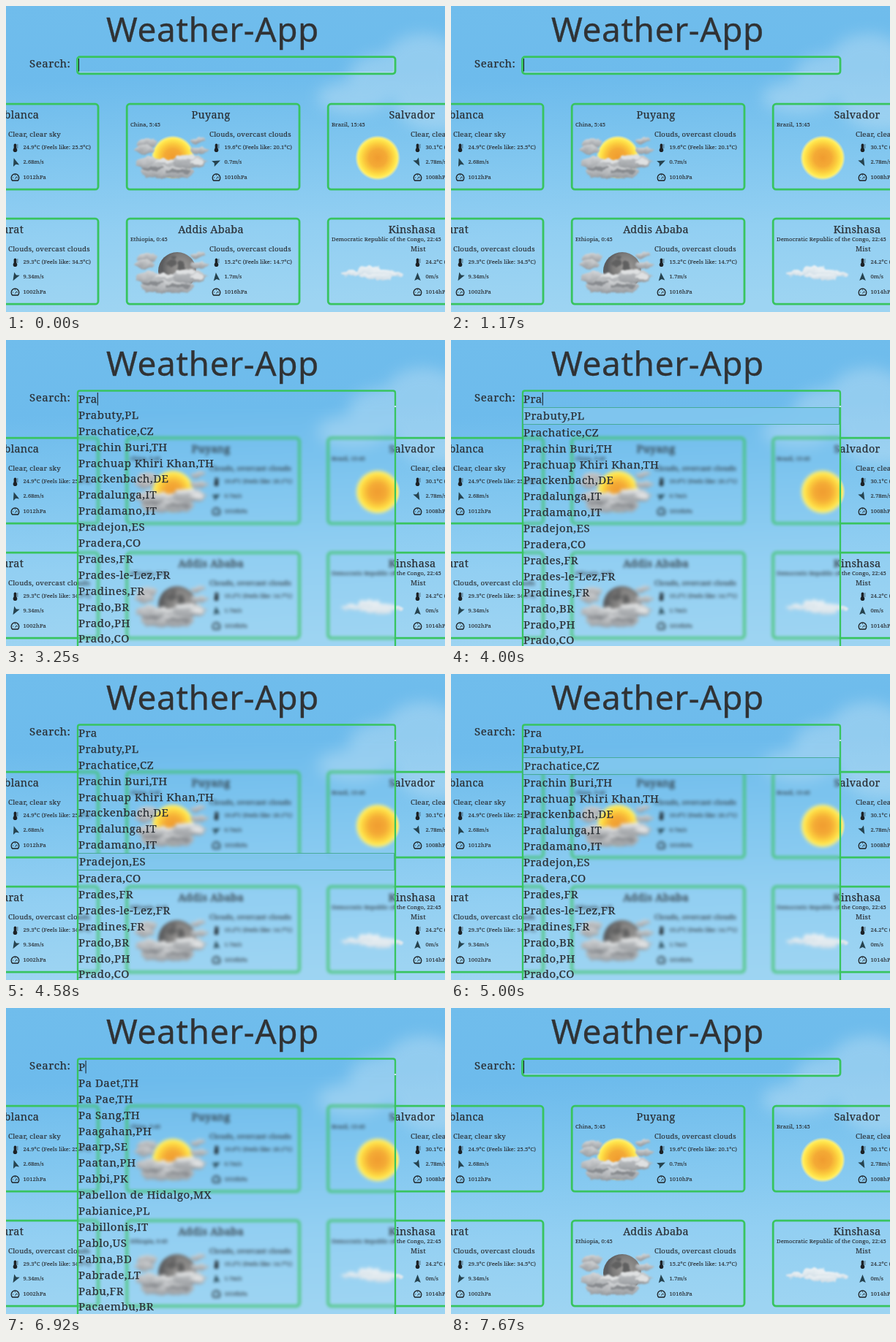
These frames come from a looping animation (600 by 419 pixels, 8000 ms). An HTML page:

```html
<!DOCTYPE html>
<html lang="en">
<head>
<meta charset="utf-8">
<title>Weather-App</title>
<style>
  html, body { margin: 0; width: 100%; height: 100%; overflow: hidden; background: #78c0ea; }
  svg { position: absolute; left: 0; top: 0; width: 600px; height: 419px; }
  text { font-family: "Noto Serif", serif; fill: #2b3036; stroke: #2b3036; stroke-width: .15; white-space: pre; }
  .title { font: 46px "Noto Sans", sans-serif; letter-spacing: .6px; fill: #303234; stroke: #303234; stroke-width: .3; stroke-linejoin: round; }
  .big { font-size: 15px; letter-spacing: .5px; stroke-width: .25; }
  .city { font-size: 14.4px; letter-spacing: .3px; text-anchor: middle; stroke-width: .25; }
  .sky { font-size: 9.7px; letter-spacing: .2px; }
  .small { font-size: 7.6px; letter-spacing: .12px; }
  .edge { fill: none; stroke: #38c45f; }
  #panel { position: absolute; left: 98px; top: 93px; width: 434px; height: 326px; backdrop-filter: blur(2px); }
</style>
</head>
<body>
<svg id="scene" viewBox="0 0 600 419">
  <defs>
    <linearGradient id="air" x2=".05" y2="1">
      <stop offset="0" stop-color="#70bdec"/>
      <stop offset=".25" stop-color="#6dbbec"/>
      <stop offset=".5" stop-color="#80c6ef"/>
      <stop offset=".75" stop-color="#92cff2"/>
      <stop offset="1" stop-color="#9dd4f2"/>
    </linearGradient>
    <radialGradient id="sun">
      <stop offset="0" stop-color="#f09c30"/>
      <stop offset=".38" stop-color="#f4aa35"/>
      <stop offset=".6" stop-color="#fbc83c"/>
      <stop offset=".78" stop-color="#ffe44a"/>
      <stop offset=".87" stop-color="#ffee68"/>
      <stop offset="1" stop-color="#fff3a0" stop-opacity="0"/>
    </radialGradient>
    <radialGradient id="moon" cx=".6" cy=".4">
      <stop offset="0" stop-color="#a09e9c"/>
      <stop offset=".7" stop-color="#7c7b7a"/>
      <stop offset="1" stop-color="#5b5c5e"/>
    </radialGradient>
    <linearGradient id="puff" x2="0" y2="1">
      <stop offset="0" stop-color="#d3d5d7"/>
      <stop offset=".55" stop-color="#b0b3b6"/>
      <stop offset="1" stop-color="#94979b"/>
    </linearGradient>
    <linearGradient id="mist" x2="0" y2="1">
      <stop offset="0" stop-color="#eef3f6"/>
      <stop offset="1" stop-color="#cfdce5"/>
    </linearGradient>
    <filter id="soft" x="-30%" y="-30%" width="160%" height="160%">
      <feTurbulence type="fractalNoise" baseFrequency=".09" numOctaves="2" seed="4"/>
      <feDisplacementMap in="SourceGraphic" scale="9" xChannelSelector="R" yChannelSelector="G"/>
      <feGaussianBlur stdDeviation="1.2"/>
    </filter>
    <filter id="haze" x="-60%" y="-60%" width="220%" height="220%"><feGaussianBlur stdDeviation="10"/></filter>
  </defs>
  <rect width="600" height="419" fill="url(#air)"/>
  <g id="world"></g>
</svg>
<div id="panel"></div>
<svg id="ui" viewBox="0 0 600 419"></svg>

<script>
const $ = id => document.getElementById(id);
const text = (cls, x, y, s) => `<text class="${cls}" x="${x}" y="${y}">${s}</text>`;
const ellipses = (list, fill) => list.map(([x, y, rx, ry]) =>
  `<ellipse cx="${x}" cy="${y}" rx="${rx}" ry="${ry}" fill="${fill}"/>`).join('');
const disc = (x, y, r, fill) => `<circle cx="${x}" cy="${y}" r="${r}" fill="${fill}"/>`;
const soft = s => `<g filter="url(#soft)">${s}</g>`;

// Icon coordinates are relative to the top left corner of a card.
const clouds = soft(ellipses([
  [28, 55, 14, 7], [25, 64, 13, 6], [97, 51, 10, 4], [100, 65, 12, 4],
  [32, 82, 19, 8], [58, 86, 26, 9], [86, 80, 24, 10], [56, 95, 38, 8]], 'url(#puff)') +
  ellipses([[82, 73, 14, 4], [52, 80, 14, 3], [98, 80, 9, 4]], '#dfe1e2') +
  ellipses([[36, 90, 15, 3], [72, 93, 16, 3]], '#888b8f'));

const icons = {
  none: '',
  sun: disc(69, 75, 31, 'url(#sun)'),
  cloudySun: disc(64, 74, 30, 'url(#sun)') + clouds,
  cloudyMoon: disc(70, 73, 26, 'url(#moon)') +
    soft(ellipses([[61, 62, 7, 5], [75, 66, 6, 6], [66, 54, 5, 3]], '#616161')) + clouds,
  mist: soft(ellipses([
    [38, 76, 20, 3], [58, 73, 18, 7], [76, 75, 18, 6], [90, 77, 14, 3], [66, 81, 24, 4]], 'url(#mist)'))
};

const gauges = wind => `<g transform="translate(123.5 61)" fill="#1d2226">
  <rect x="-1.8" y="-5.5" width="3.6" height="9" rx="1.8"/><circle cy="3.3" r="2.8"/>
  <path d="M2.4-4h1.6M2.4-2h1.6M2.4 0h1.6" stroke="#1d2226" stroke-width=".7"/>
  <path d="M0-6L4.3 5L0 3L-4.3 5Z" transform="translate(0 20) rotate(${wind})" fill="#26434f"/>
  <g transform="translate(0 41)" fill="none" stroke="#1d2226">
    <path d="M-3.8 4A5.3 5.3 0 1 1 3.8 4Z" stroke-width="1.3"/>
    <path d="M0 1.6L2.5-1.6M-3.4 0h1M0-3.6v1M2.6 .3h1" stroke-width="1"/>
  </g></g>`;

function card(col, row, city, place, sky, temp, speed, pressure, wind, icon) {
  return `<g transform="translate(${164 + 275 * col} ${133 + 157 * row})">
    <rect class="edge" x="1.2" y="1.2" width="235.8" height="117" rx="4" stroke-width="2.8"/>
    ${icons[icon]}${gauges(wind)}` +
    text('city', 116, 21, city) + text('small', 6, 32.3, place) + text('sky', 114, 45.7, sky) +
    text('small', 134.5, 63, temp) + text('small', 134.5, 83.3, speed + 'm/s') +
    text('small', 134.5, 104, pressure + 'hPa') + '</g>';
}

const feel = (a, b) => `${a}°C (Feels like: ${b}°C)`;
const overcast = 'Clouds, overcast clouds', clear = 'Clear, clear sky';

$('world').innerHTML =
  `<g filter="url(#haze)" opacity=".3">${ellipses([
    [570, 70, 50, 32], [520, 95, 52, 30], [475, 125, 50, 22], [590, 130, 60, 40]], '#e9f3f8')}</g>` +
  text('title', 137, 48.5, 'Weather-App') + text('big', 32, 84, 'Search:') +
  card(-1, 0, 'Casablanca', '', clear, feel('24.9', '25.5'), '2.68', 1012, -18, 'none') +
  card(0, 0, 'Puyang', 'China, 5:45', overcast, feel('19.6', '20.1'), '0.7', 1010, 65, 'cloudySun') +
  card(1, 0, 'Salvador', 'Brazil, 15:45', clear, feel('30.1', '33.2'), '2.78', 1008, 152, 'sun') +
  card(-1, 1, 'Surat', '', overcast, feel('29.3', '34.5'), '9.34', 1002, 210, 'none') +
  card(0, 1, 'Addis Ababa', 'Ethiopia, 0:45', overcast, feel('15.2', '14.7'), '1.7', 1016, -6, 'cloudyMoon') +
  card(1, 1, 'Kinshasa', 'Democratic Republic of the Congo, 22:45', 'Mist', feel('24.2', '24.9'), '0', 1014, 0, 'mist');

const split = s => s.split('|');
const listP = split('Pa Daet,TH|Pa Pae,TH|Pa Sang,TH|Paagahan,PH|Paarp,SE|Paatan,PH|Pabbi,PK|Pabellon de Hidalgo,MX|Pabianice,PL|Pabillonis,IT|Pablo,US|Pabna,BD|Pabrade,LT|Pabu,FR|Pacaembu,BR');
const listPr = split('Prabuty,PL|Prachatice,CZ|Prachin Buri,TH|Prachuap Khiri Khan,TH|Prackenbach,DE|Pradalunga,IT|Pradamano,IT|Pradejon,ES|Pradera,CO|Prades,FR|Prades-le-Lez,FR|Pradines,FR|Prado,BR|Prado,PH|Prado,CO');

// Value of the last [start, value] step that has begun.
const at = (steps, t) => steps.filter(s => s[0] <= t).pop()[1];
const typed = [[0, ''], [2330, 'P'], [2830, 'Pr'], [3170, 'Pra'], [6670, 'Pr'], [6920, 'P'], [7250, '']];
const caret = [[0, 1], [2000, 0], [2330, 1], [4500, 0], [5580, 1]];
const hovers = [[0, -1], [4830, 2], [5000, 1], [5080, 0], [5250, -1]];

function hoverAt(t) {
  if (t >= 4000 && t < 4830) return Math.min(7, Math.floor((t - 3990) / 83));
  return at(hovers, t);
}

function draw(query, hover, blink) {
  const open = query !== '';
  $('panel').style.display = open ? 'block' : 'none';
  let out;
  if (open) {
    out = '<path class="edge" d="M98 419V72.5q0-3 3-3H529q3 0 3 3V419" stroke-width="2.3"/>' +
      '<path d="M532 90v2" stroke="#c6e8e4" stroke-width="2.3"/>';
    (query === 'P' ? listP : listPr).forEach((name, i) => {
      const on = i === hover;
      const shift = hover < 0 || i < hover ? 0 : on ? 1 : 2;
      const y = 107.8 + 21.9 * i + shift;
      if (on) out += `<rect x="98.5" y="${Math.round(y - 16.8) + .5}" width="432" height="23" fill="#80c6ee" fill-opacity=".93" stroke="#3fa68c" stroke-opacity=".85"/>`;
      out += text('big', on ? 100 : 99, y, name);
    });
  } else {
    out = '<path d="M100 90.5H530V72" fill="none" stroke="#d4ecf4" stroke-opacity=".55"/>' +
      '<rect class="edge" x="97.5" y="69.6" width="434.5" height="23.2" rx="3.5" stroke-width="2.8"/>';
  }
  $('ui').innerHTML = out + text('big', 99, 86, query);
  if (blink) {
    const width = open ? $('ui').lastChild.getComputedTextLength() : 0;
    $('ui').insertAdjacentHTML('beforeend',
      `<path d="M${99.5 + width} 72V89.5" stroke="#15181b"/>`);
  }
}

let last;
function frame(now) {
  const t = now % 8000;
  const state = [at(typed, t), hoverAt(t), at(caret, t)];
  if (String(state) !== last) {
    last = String(state);
    draw(...state);
  }
  requestAnimationFrame(frame);
}
frame(0);
</script>
</body>
</html>
```
